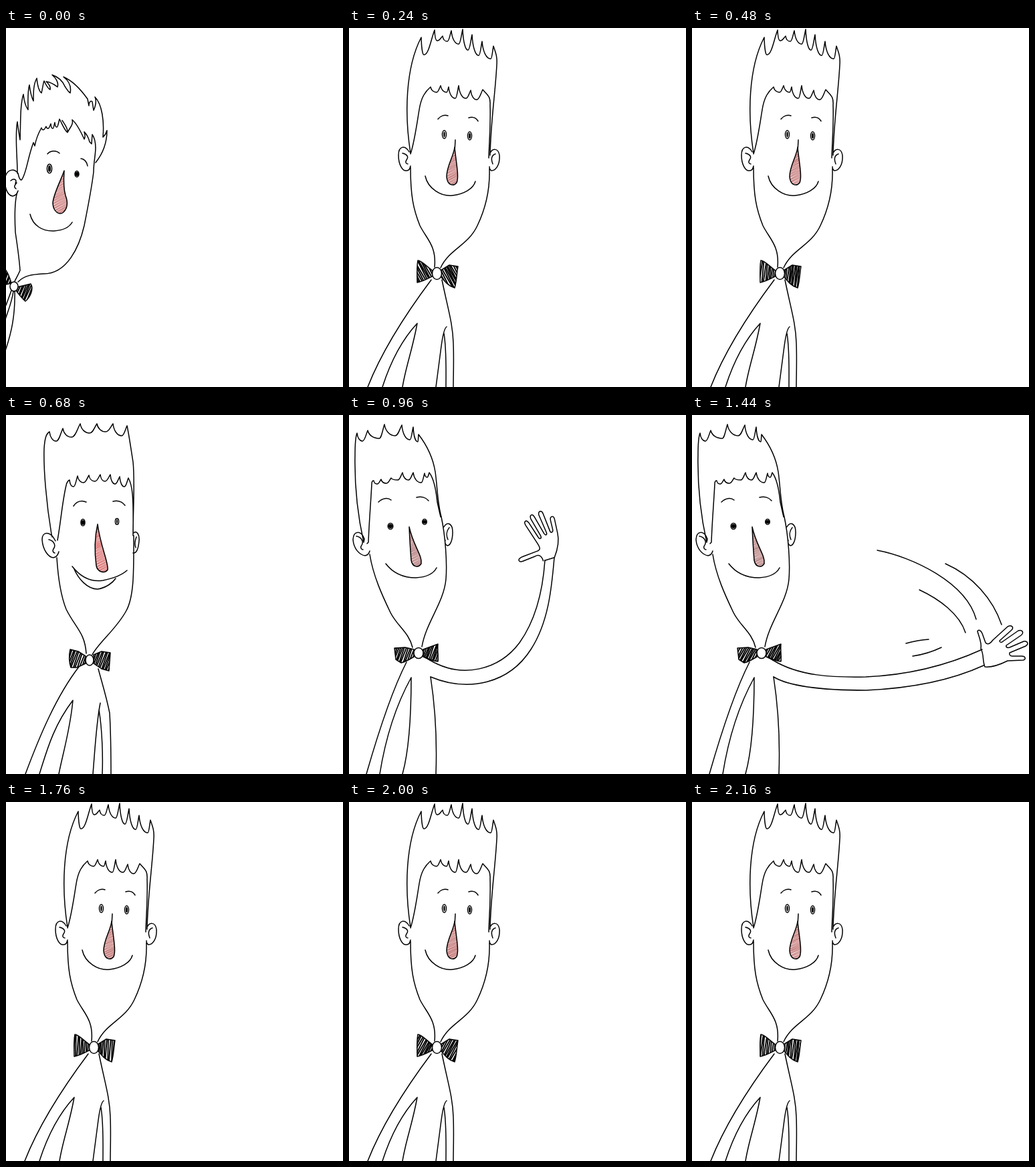
Write an HTML page with a canvas that moves like this. It is 504x536 px and loops after 2200 ms.

```html
<!DOCTYPE html>
<html lang="en">
<head>
<meta charset="utf-8">
<title>Waving man</title>
<style>
  html, body { margin: 0; width: 100%; height: 100%; overflow: hidden; background: #fff; }
  canvas { display: block; }
</style>
</head>
<body>
<canvas id="stage" width="504" height="536"></canvas>
<script>
const ctx = document.getElementById('stage').getContext('2d');
const LOOP = 2200, STEP = 40;

// Tufts of hair: alternating tips and rounded valleys, starting at a tip.
function tufts(...p) {
  let d = '';
  for (let i = 2; i < p.length; i += 2) {
    const [x, y, u, v] = p.slice(i - 2, i + 2);
    const dx = u - x, dy = v - y;
    d += (i / 2) % 2
      ? `C${x + dx * .1} ${y + dy * .6} ${u - dx * .5} ${v} ${u} ${v}`
      : `C${x + dx * .45} ${y} ${u - dx * .35} ${v - dy * .4} ${u} ${v}`;
  }
  return d;
}

function pose(o) {
  return {
    ...o,
    lines: new Path2D(o.lines.join(' ')),
    nose: new Path2D(o.nose),
    wings: o.wings.map(w => new Path2D(w))
  };
}

const peek = pose({
  lines: [
    'M17 217C17 190 13 160 17 140C18 150 20 160 21 167C22 140 21 115 26 99C27 108 29 117 33 122C33 108 32 95 35 85C36 93 38 103 41 109C41 96 41 84 46 75C47 85 49 94 53 97C55 90 55 84 57 79C60 85 62 90 66 92C67 88 64 83 60 80C68 81 73 85 77 88C79 82 75 75 69 70C78 73 85 80 88 87',
    'M88 87C90 90 93 95 96 97C98 87 94 79 86 73C100 79 112 92 122 106L124 116C124 110 127 108 129 110L131 123C134 116 136 109 133 103C144 114 147 140 145 163C148 160 150 157 151 153C151 170 146 186 134 201',
    'M18 217C19 222 21 227 23 227C30 220 32 195 41 171L43 176C45 165 48 158 53 149',
    tufts(53, 149, 56, 152, 60, 147, 63, 150, 67, 143, 70, 150, 73, 141, 76, 148, 80, 136),
    'C84 143 87 152 92 156C93 150 88 144 84 138M92 156C96 148 101 144 99 137C105 142 112 155 117 166C119 162 118 158 117 155C121 159 124 166 125 170L128 173L129 159C132 163 134 172 134 180',
    'M134 178C134 190 131 200 131 215C128 240 122 270 117 295C110 325 92 368 55 367C40 368 28 369 18 379',
    'M17 245C12 260 13 285 14 305C17 325 20 345 21 362C18 369 15 374 13 378',
    'M18 217C12 209 2 211-1 222C-3 238 2 250 10 251C15 250 17 247 18 243M7 228C12 224 17 226 14 232M16 231C13 235 11 237 15 240',
    'M62 188C66 183 75 182 80 187M112 195C116 195 121 199 122 206',
    'M36 278C40 295 55 304 72 303C85 302 95 297 99 290',
    'M8 392L0 414M11 393C9 408 4 420-1 435M13 392C14 430 8 455-1 482'
  ],
  nose: 'M87 213C81 230 70 250 70 262C71 275 80 280 86 275C93 268 92 258 89 250C86 240 86 228 87 213Z',
  noseAt: [80, 245], ink: '#cf8585',
  wings: ['M8 381C5 370 0 360-6 355L-8 385Z', 'M16 387L37 382C42 390 36 402 29 408C24 404 18 396 14 391Z'],
  knot: [12, 386, 6, 7],
  eyes: [[65, 210, 3.6, 6.8, 2], [106, 218, 3, 4.5, 3]]
});

const front = pose({
  lines: [
    'M92 187C83 130 84 60 108 14',
    tufts(108, 14, 112, 40, 128, 3, 132, 19, 140, 12, 147, 20, 153, 4, 164, 24, 170, 2, 178, 33, 184, 10, 194, 41, 199, 20, 212, 46, 216, 27),
    'C219 36 222 42 221 55C219 95 212 140 211 190',
    'M92 188C98 170 102 140 105 122C108 103 114 95 122 88',
    tufts(122, 88, 131, 96, 137, 86, 146, 96, 149, 88, 159, 105, 164, 86, 175, 105, 182, 93, 191, 107, 200, 92),
    'C207 100 212 102 211 115C212 140 210 165 209 194',
    'M90 185C84 174 74 176 74 190C74 204 80 214 86 213C90 213 91 210 92 206M80 187C86 188 90 192 86 197C84 200 85 203 88 203',
    'M211 187C214 180 223 178 225 190C226 205 219 213 213 213C211 212 210 210 210 207M219 188C213 190 212 196 215 203',
    'M92 208C92 250 96 270 106 295C116 315 131 325 128 357M210 210C211 240 204 270 192 295C178 325 150 330 137 358',
    'M133 136C137 131 143 129 148 131M179 134C186 132 190 134 193 139',
    'M114 221C118 240 138 252 155 250C172 248 186 240 189 229',
    'M123 376C90 420 50 480 28 536M102 441C75 470 60 505 50 536M102 441C95 480 85 505 80 536',
    'M139 376C148 420 155 440 156 470C157 495 156 520 156 536M146 446C143 448 140 460 138 475L130 536M142 456C146 480 145 510 145 536',
    'M159 167L158 185'
  ],
  nose: 'M158 178C156 193 146 206 146 222C147 235 156 237 161 231C165 222 160 200 158 178Z',
  noseAt: [155, 208], ink: '#c47c7c',
  wings: ['M126 363C118 358 110 348 103 347C101 358 102 370 102 380C112 378 120 373 126 370Z', 'M137 362L150 354L163 356C161 368 161 378 158 388C148 385 142 377 137 371Z'],
  knot: [131.5, 366.5, 7, 9],
  eyes: [[142.5, 159, 3, 6, 1.2], [180.5, 161, 3, 6, 1.5]]
});

const side = pose({
  lines: [
    'M68 178C60 130 56 80 57 50C58 35 60 28 65 25',
    tufts(65, 25, 75, 39, 85, 20, 98, 33, 111, 13, 125, 27, 136, 13, 149, 25, 160, 13, 173, 31, 181, 16),
    'C184 30 186 45 190 70C193 100 190 140 190 180',
    'M68 178L69 182M77 187C82 160 84 130 90 105C91 100 93 98 95 97',
    tufts(95, 97, 101, 107, 107, 91, 116, 101, 124, 90, 133, 99, 141, 89, 148, 99, 156, 89, 163, 103, 170, 92, 177, 107, 183, 94),
    'C189 105 191 120 190 180',
    'M74 188C66 172 54 174 54 186C55 202 64 213 71 213C76 212 78 208 79 204M64 186C72 188 75 195 71 200C69 203 71 206 73 206',
    'M191 176C195 172 200 178 199 188C198 200 195 207 190 206M195 182C193 187 192 193 194 198',
    'M76 213C78 245 82 270 90 290C104 318 118 325 120 356M191 180C191 230 192 270 180 292C165 320 138 340 129 358',
    'M101 136C106 128 114 127 120 130M160 129C168 127 174 130 178 135',
    'M99 226C110 240 125 250 145 247C160 244 172 240 181 232M101 228C108 245 122 260 137 260C150 258 160 250 164 244',
    'M109 376C75 420 50 480 29 536M100 426C70 465 60 505 50 536M100 426C96 470 85 505 79 536',
    'M138 379C145 405 150 420 155 445C157 480 157 510 157 536M141 430C135 460 133 500 130 536M139 440C144 470 145 510 144 536'
  ],
  nose: 'M137 163C132 185 133 210 135 225C137 235 148 237 152 231C154 222 141 195 137 163Z',
  noseAt: [142, 200], ink: '#dd7676',
  wings: ['M119 360L108 353L96 350C94 359 94 368 97 377L106 377L119 371Z', 'M131 358L143 353L156 355L154 382L143 379L131 371Z'],
  knot: [125, 366, 6, 8],
  eyes: [[115, 160.5, 3, 5, 3], [166, 159, 2.6, 4.5, 1]]
});

const wave = pose({
  lines: [
    'M22 190C13 150 8 110 9 60C9 40 10 32 12 27',
    tufts(12, 27, 20, 39, 28, 23, 45, 35, 53, 14, 69, 31, 79, 15, 91, 37, 96, 18, 103, 40, 104, 29),
    'C114 42 125 60 129 85C132 105 132 130 138 152',
    'M29 190C30 160 33 125 34 103C34 100 35 98 37 98',
    tufts(37, 98, 42, 103, 48, 96, 56, 102, 63, 94, 73, 97, 80, 86, 89, 97, 96, 86, 108, 101, 113, 87, 117, 93, 120, 86),
    'C127 95 130 110 132 130L137 152',
    'M22 190L23 185C18 172 7 172 6 186C7 200 16 209 24 210C29 209 30 206 31 203M29 190L27 192M11 181C19 182 23 190 18 196C17 199 19 201 21 201',
    'M142 167C147 158 155 162 155 175C155 188 151 195 147 195C144 194 143 190 144 187M150 168C146 173 145 180 148 186',
    'M31 208C36 240 50 270 62 295C72 315 90 325 95 347M138 152C144 180 147 220 145 245C142 280 115 310 109 346',
    'M44 130C50 124 58 123 63 127M101 123C108 121 115 123 119 128',
    'M55 222C65 235 80 243 100 243C117 242 127 236 131 228',
    'M86 369C65 410 45 470 26 536M93 392C72 430 55 480 46 536M93 392C93 440 90 500 80 536M122 391C128 430 132 480 130 536M114 362L121 366'
  ],
  nose: 'M90 167C91 190 92 205 93 217C95 227 103 229 108 222C110 210 96 195 90 167Z',
  noseAt: [99, 200], ink: '#b58484',
  wings: ['M97 350L84 347L68 348L70 365L78 370C86 368 92 364 97 361Z', 'M111 350L133 342C132 352 134 360 133 368C125 367 118 364 111 361Z'],
  knot: [104, 355.5, 7, 8],
  eyes: [[62, 166, 3.8, 4.6, 3], [113, 159.5, 3.3, 4, 3]]
});

const WRIST = [396, 274];
const hand = new Path2D('M387 270C390 262 388 258 382 257L364 251C357 249 358 243 366 245L389 253C395 255 396 252 397 245L401 212C402 206 407 206 407 212L404 237C403 243 407 243 408 239L413 210C415 204 420 205 419 211L414 240C414 244 417 244 418 240L426 213C429 208 434 210 432 216L423 243C423 246 426 247 428 243L434 231C437 225 443 227 440 233L430 252C424 264 412 272 403 277L389 271');

const arm = (d, wrist, turn = 0) => ({ path: new Path2D(d), wrist, turn });
const arms = {
  high: arm('M121 366C170 395 225 380 255 340C280 305 290 260 293 217M122 391C180 415 240 400 272 350C298 310 303 260 307 213', [300, 215], -40),
  up: arm('M121 366C180 395 250 385 290 345C315 318 330 285 337 240M122 391C180 415 260 405 305 360C335 325 345 280 353 240', [345, 240], -22),
  mid: arm('M121 366C150 385 200 389 260 382C320 372 355 340 390 271M122 391C150 405 200 408 260 403C330 390 380 330 403 277' +
    'M250 181C290 180 325 188 364 208M273 207C305 208 330 213 352 226M263 237C295 238 325 250 350 263M323 300C315 322 302 342 280 355M299 311Q297 319 290 328', WRIST),
  down: arm('M121 366C160 390 210 392 260 391C330 388 390 370 434 350M122 391C150 408 210 411 260 411C330 408 390 395 436 374' +
    'M277 202C330 212 410 250 425 305M340 261C370 275 400 297 409 325M379 222C420 240 450 275 463 313M320 341Q338 336 354 335M330 360Q352 357 373 347' +
    'M438 376C434 366 437 358 432 349C434 340 428 328 427 323C428 320 432 321 434 326L439 340C443 344 447 340 450 336L472 316C478 313 482 317 478 321L460 337C460 340 463 340 465 338L488 322C494 320 497 325 492 329L470 344C469 347 472 348 475 347L496 338C502 337 504 342 499 345L475 355C474 358 476 360 479 360L493 360C499 360 500 365 495 366L472 367C458 374 448 377 438 376')
};

const timeline = [
  [0, peek], [120, front, null, 2], [200, front], [600, side],
  [960, wave, 'high'], [1040, wave, 'up'], [1160, wave, 'mid'], [1360, wave, 'down'],
  [1520, wave, 'mid'], [1600, wave, 'up'], [1640, wave, 'high'], [1720, front]
];

// Slant of the bow hatching, one per boil step.
const slants = [.4, .5, .05, .35, -.2, .12, -.5];

function random(seed) {
  return () => (seed = (seed * 16807) % 2147483647) / 2147483647;
}

function hatch(path, x, y, angle, gap, width, color, rnd) {
  ctx.save();
  ctx.clip(path);
  ctx.translate(x, y);
  ctx.rotate(angle);
  ctx.beginPath();
  for (let v = -48, s = 1; v < 48; v += gap * (.7 + .6 * rnd()), s = -s) ctx.lineTo(s * 48, v);
  ctx.strokeStyle = color;
  ctx.lineWidth = width;
  ctx.stroke();
  ctx.restore();
}

function oval(x, y, rx, ry) {
  ctx.beginPath();
  ctx.ellipse(x, y, rx, ry, 0, 0, 7);
}

function drawArm({ path, wrist, turn }, ownHand) {
  ctx.stroke(path);
  if (ownHand) return;
  ctx.save();
  ctx.translate(...wrist);
  ctx.rotate(turn * Math.PI / 180);
  ctx.translate(-WRIST[0], -WRIST[1]);
  ctx.stroke(hand);
  ctx.restore();
}

function drawMan(p, step) {
  const rnd = random(step * 977 + 31);
  const slant = slants[step % slants.length];
  ctx.stroke(p.lines);

  ctx.fillStyle = '#f3dada';
  ctx.fill(p.nose);
  hatch(p.nose, ...p.noseAt, -.5 + rnd() * .2, 1.7, 1.1, p.ink, rnd);
  ctx.stroke(p.nose);

  const [kx, ky, rx, ry] = p.knot;
  p.wings.forEach((w, i) => {
    hatch(w, kx + (i ? 18 : -18), ky, Math.PI / 2 + slant, 2.6, 1.9, '#000', rnd);
    ctx.stroke(w);
  });
  oval(kx, ky, rx, ry);
  ctx.fillStyle = '#fff';
  ctx.fill();
  ctx.stroke();

  ctx.fillStyle = '#000';
  for (const [x, y, w, h, pupil] of p.eyes) {
    oval(x, y, w, h);
    ctx.stroke();
    oval(x, y, pupil, h * .7);
    ctx.fill();
  }
}

function draw(time) {
  const t = time % LOOP;
  const [, man, reach, lean = 0] = timeline.findLast(k => k[0] <= t);
  ctx.fillStyle = '#fff';
  ctx.fillRect(0, 0, 504, 536);
  ctx.strokeStyle = '#000';
  ctx.lineWidth = 1.5;
  ctx.lineCap = ctx.lineJoin = 'round';
  ctx.save();
  ctx.translate(131, 366);
  ctx.rotate(lean * Math.PI / 180);
  ctx.translate(-131, -366);
  drawMan(man, Math.floor(t / STEP));
  if (reach) drawArm(arms[reach], reach === 'down');
  ctx.restore();
}

const start = performance.now();
(function tick() {
  draw(performance.now() - start);
  requestAnimationFrame(tick);
})();
</script>
</body>
</html>
```
